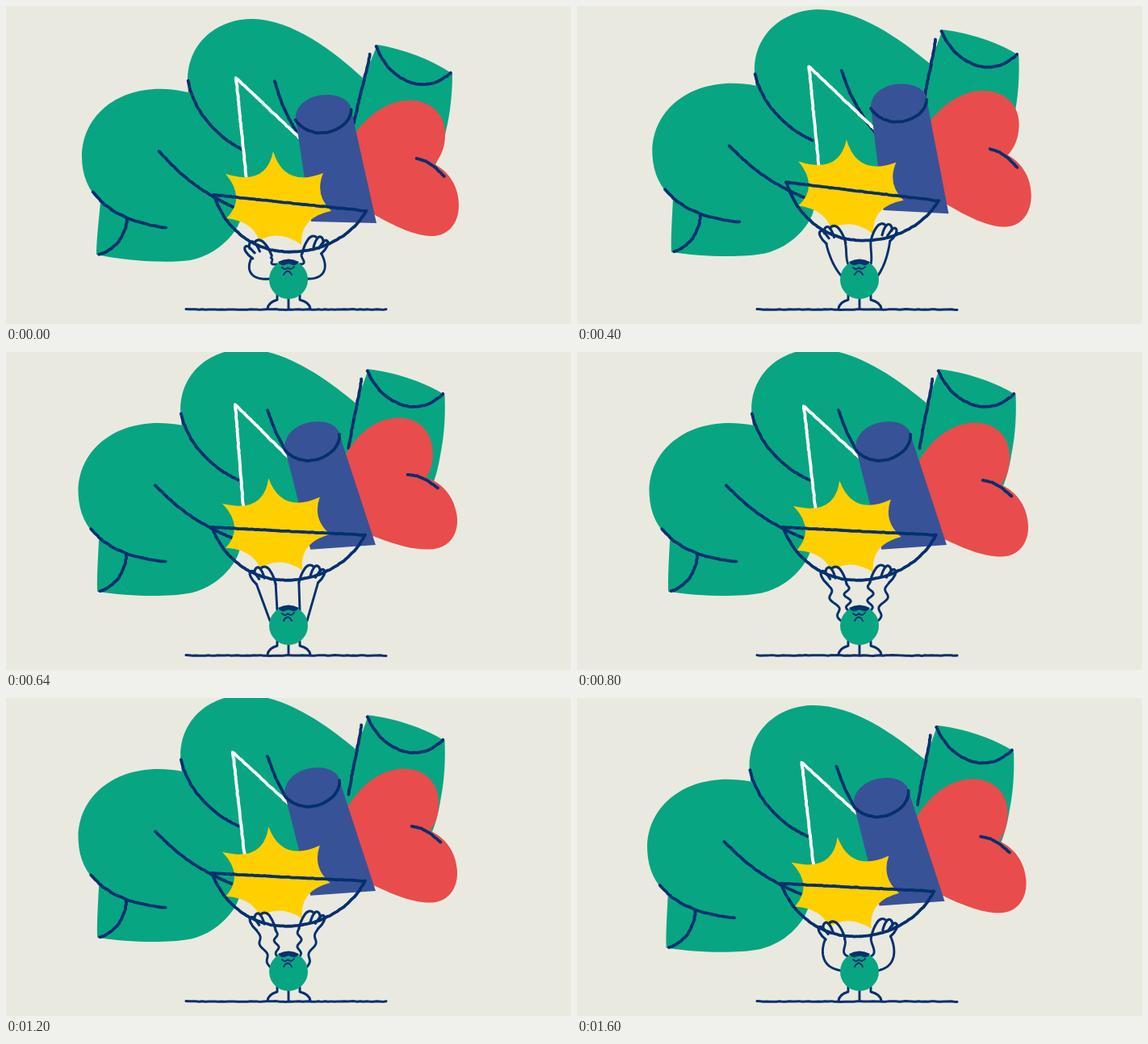
These frames come from a looping animation (700x394 px, 1680 ms). An HTML page:

```html
<!DOCTYPE html>
<html lang="en">
<head>
<meta charset="utf-8">
<title>Heavy load</title>
<style>
html, body { margin: 0; width: 100%; height: 100%; overflow: hidden; background: #eae9e0; }
svg { display: block; width: 100%; height: 100%; }
.ink { fill: none; stroke: #04306d; stroke-width: 3.8; stroke-linecap: round; stroke-linejoin: round; }
.thin { stroke-width: 2.9; }
</style>
</head>
<body>
<svg viewBox="0 0 700 394">
  <g id="leaves">
    <g fill="#08a582">
      <path d="M226 107C150 89 94 130 94 187C94 210 102 228 117 243C115 265 112 290 112 308C150 316 200 319 228 315C262 309 288 280 291 262L330 250L300 170Z"/>
      <path d="M225 92C225 45 262 16 305 16C355 17 405 55 443 90L440 160L420 240L300 250L220 190L226 108Z"/>
      <path d="M460 48C490 53 525 65 553 84C553 110 550 135 545 155C541 175 536 190 528 205L432 160L443 90Z"/>
    </g>
    <path class="ink" d="M226 93C230 124 255 158 293 178"/>
    <path class="ink" d="M190 180C215 210 245 232 281 249"/>
    <path class="ink" d="M108 230C126 256 155 268 198 275"/>
    <path class="ink" d="M150 265C147 287 136 301 115 308"/>
    <path class="ink" d="M333 93C342 126 356 154 376 178"/>
    <path class="ink" d="M451 60C445 90 437 115 431 145"/>
    <path class="ink" d="M459 50C467 75 490 96 514 97C530 98 543 90 551 83"/>
  </g>
  <g id="wire"><path class="ink" style="stroke:#fff" d="M300 235L285 89L378 177"/></g>
  <g id="heart">
    <path fill="#e94c4c" d="M425 168C448 133 474 117 500 117C528 117 545 136 544 160C544 176 538 188 531 196C550 206 561 225 561 247C561 271 546 286 526 285C500 284 470 266 450 255L430 200Z"/>
    <path class="ink" d="M509 189C522 191 533 200 543 211"/>
  </g>
  <g id="tube">
    <path fill="#385297" d="M378 267L359 141C357 122 378 109 398 110C416 110 428 119 428 130L459 269Z"/>
    <path class="ink" d="M359 141C366 154 385 160 400 156C416 152 427 142 428 128"/>
  </g>
  <g id="star"><path id="burst" fill="#ffd000"/></g>
  <g id="bowl">
    <path class="ink" d="M257 244L447 244"/>
    <path class="ink" d="M257 244C276 286 312 305 347 305C388 305 430 282 447 244"/>
  </g>
  <g id="arms"></g>
  <g class="ink thin">
    <path d="M336 358V364Q325 367 324 375M350 360V375M364 358V364Q376 367 377 375"/>
    <circle cx="350" cy="339" r="24" fill="#08a582" stroke="none"/>
    <path fill="#04306d" stroke="none" d="M337 317Q350 310 363 317Q360 322 355 321Q350 318 345 321Q340 322 337 317Z"/>
    <path style="stroke-width:2" d="M342 324Q346 328 349 324Q353 328 357 323M344 333Q349 324 354 333"/>
  </g>
  <path id="ground" class="ink" style="stroke-width:3"/>
</svg>
<script>
const LOOP = 1680, STEP = 80;
const $ = id => document.getElementById(id);
const mix = (a, b, u) => a + (b - a) * u;
const ramp = (t, from, to) => Math.min(1, Math.max(0, (t - from) / (to - from)));
const smooth = (t, from, to) => { const u = ramp(t, from, to); return u * u * (3 - 2 * u); };

// Everything that moves follows these few curves.
function motion(t) {
  const reset = ramp(t, 1600, LOOP);
  return {
    lift: 1 - (1 - ramp(t, 240, 640)) ** 2 - ramp(t, 1200, LOOP) ** 3,
    sway: 2 * smooth(t, 0, 240) - 4 * smooth(t, 360, 640) - 2.5 * smooth(t, 1200, 1600) + 4.5 * reset,
    tilt: smooth(t, 0, 240) - 2 * smooth(t, 240, 640) + reset,
    lean: smooth(t, 160, 400) - reset,
    kick: Math.sin(Math.PI * ramp(t, 480, 800)),
    shake: ramp(t, 640, 720) * mix(4.3, 2.8, ramp(t, 720, 1200)) * (1 - ramp(t, 1200, 1360)),
    phase: (t - 800) / 400 * 2 * Math.PI
  };
}

// Pivot and own movement (x, y, degrees) on top of the shared lift and sway.
const parts = {
  leaves: { pivot: [350, 245], move: m => [0, 0, -2.6 * m.lean] },
  wire: { pivot: [285, 89], move: m => [2 * m.tilt + 3 * m.kick, -2 * m.kick, .6 * m.tilt + 2 * m.kick] },
  heart: { pivot: [509, 189], move: m => [4 * m.tilt - 5 * m.kick, 8 * m.tilt - 7 * m.kick, 4 * m.tilt - 5 * m.kick] },
  tube: { pivot: [458, 269], move: m => [-m.tilt, 8 * m.tilt, 5.6 * m.tilt] },
  star: { pivot: [336, 243], move: m => [0, -m.tilt - 3 * m.kick, 3.4 * m.tilt] },
  bowl: { pivot: [352, 244], move: m => [0, 0, 6 + 3.1 * m.tilt] }
};

function random(seed) {
  return () => (seed = seed * 16807 % 2147483647) / 2147483647;
}

const toPath = pts => "M" + pts.map(p => p.map(v => v.toFixed(2)).join(" ")).join("L");

// Slightly uneven brush edge.
function roughen(path, seed) {
  const rnd = random(seed), len = path.getTotalLength(), n = Math.ceil(len / 3), pts = [];
  for (let i = 0; i <= n; i++) {
    const p = path.getPointAtLength(len * i / n);
    pts.push([p.x + (rnd() - .5) * .7, p.y + (rnd() - .5) * .7]);
  }
  path.setAttribute("d", toPath(pts));
}

function drawGround(seed) {
  const rnd = random(seed), pts = [];
  for (let x = 223; x <= 471; x += 4) pts.push([x, 376 + (rnd() - .5) * .8]);
  $("ground").setAttribute("d", toPath(pts));
}

// Hollow sides between the tips: the longer the side, the deeper.
function burst(tips) {
  const [cx, cy] = parts.star.pivot;
  return "M" + tips[0] + tips.map(([x, y], i) => {
    const [nx, ny] = tips[(i + 1) % tips.length];
    const k = 1.7 - Math.hypot(nx - x, ny - y) / 50;
    return `Q${mix(cx, (x + nx) / 2, k)} ${mix(cy, (y + ny) / 2, k)} ${nx} ${ny}`;
  }).join("") + "Z";
}

// Cubic from hand to shoulder with a sideways wobble.
function limb(a, b, c, d, m) {
  const pts = [];
  for (let i = 0; i <= 28; i++) {
    const u = i / 28, v = 1 - u;
    const p = [0, 1].map(k => v ** 3 * a[k] + 3 * v * v * u * b[k] + 3 * v * u * u * c[k] + u ** 3 * d[k]);
    p[0] += m.shake * Math.sqrt(4 * u * v) * Math.sin(u * 12 + m.phase);
    pts.push(p);
  }
  return toPath(pts);
}

const fingers = "M-8 9C-14 4 -18 -4 -14 -6C-11 -7 -8 -1 -5 3" +
  "M-10 -3C-11 -10 -6 -12 -4 -9C-1 -6 0 -2 1 2" +
  "M-3 -9C0 -13 5 -11 8 -6C12 0 13 5 14 9";

function arm(x, y, turn, bend, m) {
  const size = 1.08;
  const line = (from, to, o1, o2) => {
    const bow = (u, o) => [0, 1].map(k => mix(from[k], to[k], u) + o[k] * bend);
    return limb(from, bow(1 / 3, o1), bow(2 / 3, o2), to, m);
  };
  const outer = line([x - 8 * size, y + 9 * size], [327, 333 + 5 * bend], [-15, 6], [-17, 11]);
  const inner = line([x + 14 * size, y + 9 * size], [336, 320], [3, 0], [-11, 4]);
  return `<path d="${outer}${inner}"/>` +
    `<path transform="translate(${x} ${y}) rotate(${turn}) scale(${size})" d="${fingers}"/>`;
}

function drawArms(m) {
  const reach = m.lift ** .7, bend = 1 - smooth(m.lift, .35, .75);
  const left = arm(313 + 6 * reach, 302 - 24 * reach, -8 * (1 - reach), bend, m);
  const right = arm(318 + 4 * reach, 297 - 21 * reach, 0, bend, m);
  $("arms").innerHTML = `<g class="ink thin">${left}</g>` +
    `<g class="ink thin" transform="translate(700 0) scale(-1 1)">${right}</g>`;
}

function draw(t) {
  const m = motion(t);
  for (const id in parts) {
    const { pivot: [px, py], move } = parts[id], [x, y, r] = move(m);
    $(id).setAttribute("transform",
      `translate(${x + m.sway} ${y - 22 * m.lift}) rotate(${r} ${px} ${py})`);
  }
  drawArms(m);
  drawGround(101 + t / STEP % 3 * 977);
}

$("burst").setAttribute("d", burst([[272, 208], [331, 180], [393, 207], [403, 254], [366, 296], [314, 291], [273, 263]]));
document.querySelectorAll("path.ink:not(#ground)").forEach((p, i) => roughen(p, 31 + i * 733));

let shown = -1;
function tick() {
  const t = Math.floor(performance.now() % LOOP / STEP) * STEP;
  if (t !== shown) draw(shown = t);
  requestAnimationFrame(tick);
}
tick();
</script>
</body>
</html>
```
